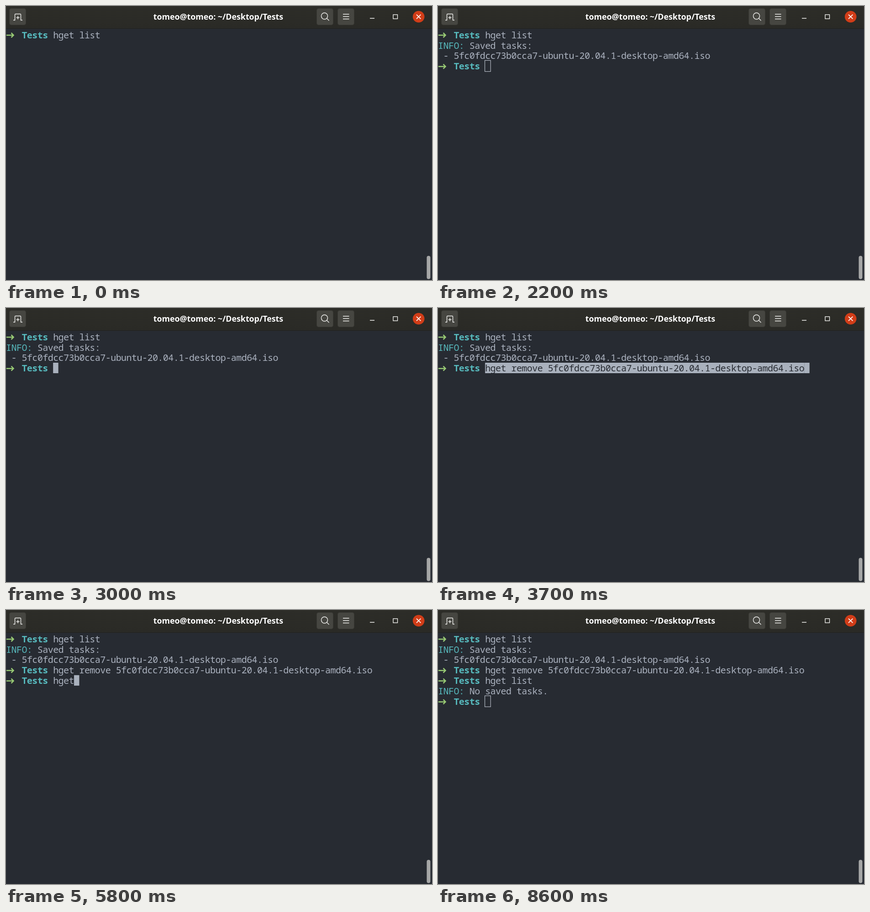
Write an HTML page that moves like this. It is 933 by 601 pixels and loops after 8700 ms.

```html
<!DOCTYPE html>
<html lang="en">
<head>
<meta charset="utf-8">
<title>Terminal</title>
<style>
  html, body { margin: 0; width: 100%; height: 100%; overflow: hidden; background: #272b32; }
  svg { display: block; width: 933px; height: 601px; }
  text { white-space: pre; }
  .ui { font-family: "Noto Sans", "Open Sans", sans-serif; font-size: 17.8px; fill: #f6f6f4; }
  .title { font-weight: 700; text-anchor: middle; fill: #fff; }
  .off { fill: #92928d; }
  .mono { font-family: "Noto Sans Mono", "DejaVu Sans Mono", monospace; font-size: 20px; letter-spacing: -0.54px; fill: #abb2bf; }
  .mono .dir { font-weight: 700; }
  .cyan { fill: #57b9bd; }
  .mono.selected { fill: #272b32; }
  .arrow { fill: none; stroke: #98ca74; stroke-width: 2.5; }
  .block { fill: #a9b1bd; }
  .hollow { fill: none; stroke: #b4bac4; stroke-width: 1.2; }
  .button { fill: #464641; stroke: #383833; }
  .icon { fill: none; stroke: #f2f2f0; stroke-width: 1.4; }
</style>
</head>
<body>
<svg viewBox="0 0 933 601">
  <defs>
    <linearGradient id="bar" x2="0" y2="1">
      <stop stop-color="#2d2d28"/><stop offset="1" stop-color="#2a2a26"/>
    </linearGradient>
  </defs>
  <rect width="933" height="601" fill="#272b32"/>

  <rect width="933" height="49" fill="url(#bar)"/>
  <rect y="49" width="933" height="1" fill="#20211f"/>
  <rect class="button" x="7.5" y="5.5" width="36" height="36" rx="4"/>
  <rect class="button" x="680.5" y="5.5" width="36" height="36" rx="4"/>
  <rect class="button" x="726.5" y="5.5" width="36" height="36" rx="4"/>
  <path class="icon" d="M16 31h3.5V19q0-1.500 1.500-1.500h10q1.500 0 1.500 1.500v12h3.500M22.500 25.500h7M26 22v7"/>
  <circle class="icon" cx="697.500" cy="22" r="7"/>
  <path class="icon" d="M702.500 27l5 5M738 18h13.500M738 23.300h13.500M738 28.500h13.500M797 27h10"/>
  <rect class="icon" x="848" y="19" width="9.500" height="9"/>
  <circle cx="903.700" cy="23.500" r="12.800" fill="#d13d18"/>
  <path class="icon" style="stroke:#fff;stroke-width:1.700" d="M899 18.800l9.400 9.400M908.400 18.800l-9.400 9.400"/>
  <text id="title" class="ui title" x="465" y="29.500"></text>

  <rect x="921.500" y="548" width="8" height="51" rx="4" fill="#a6a7a7"/>
  <g id="screen"></g>
  <g id="menu"></g>
</svg>
<script>
const LOOP = 8700, CELL = 11.46, LINE = 22.9, TOP = 51.3;
const HOME = 'tomeo@tomeo: ~/Desktop/Tests';
const ISO = '5fc0fdcc73b0cca7-ubuntu-20.04.1-desktop-amd64.iso';

// A leading "$" stands for the prompt.
const listed = ['$hget list', 'INFO: Saved tasks:', ' - ' + ISO];
const waiting = [...listed, '$'];
const removed = [...listed, '$hget remove ' + ISO];
const finished = [...removed, '$hget list', 'INFO: No saved tasks.', '$'];

const block = (col, row) => ({ kind: 'block', col, row });
const hollow = (col, row) => ({ kind: 'hollow', col, row });
const typed = s => ({ lines: [...removed, '$' + s], cursor: block(9 + s.length, 4) });

// Each step changes only the fields it names.
const steps = [
  [0, { title: HOME, lines: ['$hget list'], cursor: null, menu: false, selected: false }],
  [100, { cursor: block(18, 0) }],
  [700, { lines: waiting, cursor: block(9, 3) }],
  [1200, { cursor: null }],
  [1800, { cursor: block(9, 3) }],
  [2200, { cursor: hollow(9, 3) }],
  [2500, { menu: true }],
  [3000, { menu: false, cursor: block(9, 3) }],
  [3300, { lines: removed, selected: true, cursor: block(70, 3) }],
  [3600, { cursor: null }],
  [3700, { cursor: block(70, 3) }],
  [4000, { selected: false, cursor: block(0, 4), title: 'hget remove 5fc0fdcc73b0cca7-ubuntu-20…' }],
  [4300, { title: HOME, ...typed('') }],
  [4800, { cursor: null }],
  [5200, typed('')],
  [5300, typed('h')],
  [5400, typed('hg')],
  [5600, typed('hge')],
  [5800, typed('hget')],
  [5900, typed('hget ')],
  [6100, typed('hget l')],
  [6300, typed('hget li')],
  [6500, typed('hget list')],
  [6600, { lines: finished, cursor: block(9, 6) }],
  [7200, { cursor: null }],
  [7800, { cursor: block(9, 6) }],
  [8600, { cursor: hollow(9, 6) }]
];
const states = [];
for (const [at, change] of steps) states.push({ ...states.at(-1), ...change, at });

const byId = id => document.getElementById(id);

function add(parent, tag, attrs, text = '') {
  const el = document.createElementNS('http://www.w3.org/2000/svg', tag);
  for (const key in attrs) el.setAttribute(key, attrs[key]);
  el.textContent = text;
  parent.append(el);
  return el;
}

function buildMenu(menu) {
  add(menu, 'rect', { x: 298.5, y: 110.5, width: 200, height: 271, rx: 7, fill: '#20211f' });
  add(menu, 'rect', { x: 299.5, y: 111.5, width: 198, height: 269, rx: 6, fill: '#3f3f3a' });
  const groups = [
    ['Copy', 'Copy as HTML', 'Paste'],
    ['Read-Only', 'Preferences'],
    ['New Window', 'New Tab'],
    ['Show Menubar']
  ];
  let y = 139.8;
  groups.forEach((group, i) => {
    if (i) {
      add(menu, 'rect', { x: 300, y: Math.round(y - 23), width: 197, height: 1, fill: '#353530' });
      y += 1;
    }
    for (const label of group) {
      const off = label.startsWith('Copy') ? ' off' : '';
      add(menu, 'text', { class: 'ui' + off, x: 336, y }, label);
      y += 32;
    }
  });
}

function drawLine(screen, line, row, selected) {
  const top = TOP + row * LINE, y = top + 19.3;
  const put = (col, text, cls = '') =>
    add(screen, 'text', { class: 'mono', x: col * CELL, y }).append(
      add(screen, 'tspan', { class: cls }, text));

  if (line[0] === '$') {
    const mid = top + 12.7;
    add(screen, 'path', { class: 'arrow', d: `M1 ${mid}H16.500M11.500 ${mid - 5}l5 5l-5 5` });
    put(3, 'Tests', 'dir cyan');
    const command = line.slice(1);
    if (selected) {
      add(screen, 'rect', { class: 'block', x: 9 * CELL, y: top, width: command.length * CELL, height: 23 });
      add(screen, 'text', { class: 'mono selected', x: 9 * CELL, y }, command);
    } else put(9, command);
  } else if (line.startsWith('INFO:')) {
    put(0, 'INFO:', 'cyan');
    put(6, line.slice(6));
  } else put(0, line);
}

function drawCursor(screen, { kind, col, row }) {
  const grow = kind === 'hollow' ? 0.6 : 0;
  add(screen, 'rect', {
    class: kind, x: col * CELL - grow, y: TOP + row * LINE - grow,
    width: CELL + 2 * grow, height: 23 + 2 * grow
  });
}

function show(state) {
  const screen = byId('screen');
  screen.replaceChildren();
  byId('title').textContent = state.title;
  byId('menu').style.display = state.menu ? '' : 'none';
  state.lines.forEach((line, row) => drawLine(screen, line, row, state.selected && row === 3));
  if (state.cursor) drawCursor(screen, state.cursor);
}

let shown;
const start = performance.now();
function tick() {
  const t = (performance.now() - start) % LOOP;
  const state = states.findLast(s => s.at <= t);
  if (state !== shown) show(shown = state);
  requestAnimationFrame(tick);
}

buildMenu(byId('menu'));
tick();
</script>
</body>
</html>
```
